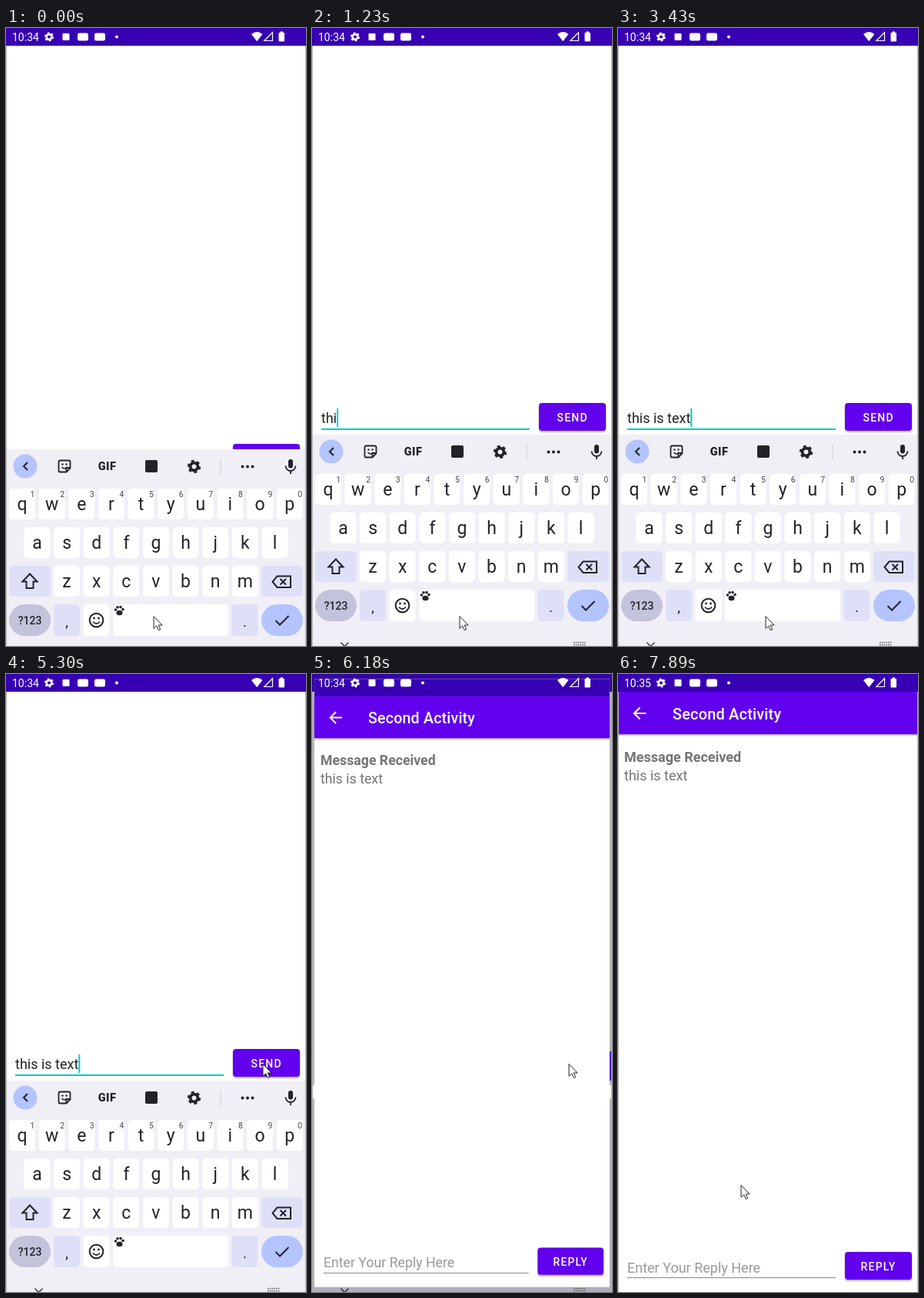
Recreate the animation shown at these times as an HTML page. Size 390x801 px, loop 8000 ms.

```html
<!DOCTYPE html>
<html lang="en">
<head>
<meta charset="utf-8">
<title>Message between two screens</title>
<style>
html, body { margin: 0; height: 100%; overflow: hidden; background: #fff; }
svg { display: block; width: 100%; height: 100%; }
text { font-family: Roboto, sans-serif; white-space: pre; }
.field { font-size: 18px; }
.button { font-size: 14px; font-weight: 500; letter-spacing: 1.25px; fill: #fff; }
.line { fill: none; stroke-width: 2; }
</style>
</head>
<body>
<svg id="stage" viewBox="0 0 390 801">
  <defs>
    <filter id="shadow" x="-10%" y="-20%" width="120%" height="150%">
      <feDropShadow dx="0" dy="1.5" stdDeviation="1.2" flood-opacity=".35"/>
    </filter>
    <clipPath id="buttonShape"><rect x="295" y="486" width="87" height="36" rx="4"/></clipPath>
  </defs>
  <rect width="390" height="801" fill="#fff"/>

  <g id="first">
    <g id="form">
      <text id="typed" class="field" x="12" y="512" fill="#222"></text>
      <rect x="12" y="519" width="271" height="2" fill="#03d0c4"/>
      <rect id="caret" y="493" width="2" height="24" fill="#03d0c4"/>
      <rect x="295" y="486" width="87" height="36" rx="4" fill="#6200ee" filter="url(#shadow)"/>
      <g clip-path="url(#buttonShape)"><circle id="ripple" cx="336" cy="507" fill="#fff"/></g>
      <text class="button" x="318.5" y="509.5">SEND</text>
    </g>
    <g id="keyboard"></g>
  </g>

  <g id="behind">
    <rect width="390" height="801" fill="#b6b6b8"/>
    <rect y="533" width="390" height="17" fill="#f4f4f4"/>
    <rect y="550" width="390" height="251" fill="#b0aebb"/>
    <rect x="386" y="489" width="4" height="38" fill="#5000c4"/>
    <rect width="390" height="23" fill="#3206a2"/>
  </g>

  <g id="second">
    <rect width="390" height="801" fill="#fff"/>
    <rect y="23" width="390" height="55" fill="#6200ee" filter="url(#shadow)"/>
    <rect width="390" height="23" fill="#3700b3"/>
    <path class="line" stroke="#fff" d="M28.5 43.5L21 51l7.5 7.5M21 51h15.5"/>
    <text x="71" y="58.5" font-size="19.9" font-weight="500" letter-spacing=".2" fill="#fff">Second Activity</text>
    <g class="field" fill="#757575">
      <text x="8" y="113.5" font-weight="700">Message Received</text>
      <text x="8" y="138">this is text</text>
      <text x="12" y="775.5" fill="#999">Enter Your Reply Here</text>
    </g>
    <rect x="12" y="782" width="271" height="1" fill="#888"/>
    <rect x="295" y="749" width="87" height="36" rx="4" fill="#6200ee" filter="url(#shadow)"/>
    <text class="button" x="315.5" y="773">REPLY</text>
  </g>

  <g id="nav"></g>
  <rect id="statusBar" width="390" height="23" fill="#3700b3"/>
  <g id="status" fill="#fff"></g>
  <path d="M.5 23V801M389.5 23V801" stroke="#b4b4b4"/>
  <path id="mouse" fill="#fff" stroke="#222" stroke-linejoin="round"
    d="M.5.5V16.3L4.2 12.9L6.8 18.6L9.2 17.5L6.7 12H11.6Z"/>
</svg>

<script>
const $ = id => document.getElementById(id);
const INK = '#222228', TINT = '#dfe0f8', BLUE = '#b4c4ff';

const rect = (x, y, w, h, fill, rx = 0) =>
  `<rect x="${x}" y="${y}" width="${w}" height="${h}" rx="${rx}" fill="${fill}"/>`;
const circle = (x, y, r, attrs = '') => `<circle cx="${x}" cy="${y}" r="${r}" ${attrs}/>`;
const stroke = (d, width = 2) =>
  `<path d="${d}" fill="none" stroke="${INK}" stroke-width="${width}"/>`;
const label = (x, y, size, str, attrs = '') =>
  `<text x="${x}" y="${y}" font-size="${size}" text-anchor="middle" ${attrs}>${str}</text>`;
const gear = (x, y, s, color) => `<g transform="translate(${x} ${y}) scale(${s})" fill="none" stroke="${color}">` +
  circle(0, 0, 4.9, 'stroke-width="3.8"') +
  circle(0, 0, 7.4, 'stroke-width="2.6" pathLength="12" stroke-dasharray="1 1"') + '</g>';

function keyRow(letters, x0, y, hints) {
  return [...letters].map((c, i) => {
    const x = x0 + i * 38.63;
    return rect(x, y, 34, 40, '#fff', 5) + label(x + 17, y + 27.5, 23, c) +
      (hints ? label(x + 30.5, y + 10.5, 10.5, (i + 1) % 10, 'fill="#44444c"') : '');
  }).join('');
}

function toolbar() {
  return circle(25, 549, 15.5, `fill="${BLUE}"`) + stroke('M28 544l-5 5 5 5') +
    stroke('M70.5 541.5h11a2 2 0 0 1 2 2v8l-5 5h-8a2 2 0 0 1-2-2v-11a2 2 0 0 1 2-2ZM83 551h-4.500v5', 1.8) +
    stroke('M72.500 550q3.500 4 7 0', 1.500) + circle(73.500, 546.500, 1.2) + circle(78.500, 546.500, 1.2) +
    label(131.5, 554, 14.5, 'GIF', 'font-weight="900" letter-spacing=".5"') +
    rect(181, 541, 16, 16, INK, 2) +
    gear(244.5, 549.5, 1, INK) + rect(278.5, 539, 1, 21, '#cfced6') +
    [307.5, 314, 320.5].map(x => circle(x, 549.5, 2)).join('') +
    rect(367, 540, 6, 11.5, INK, 3) + stroke('M363.5 548.500a6.500 6.500 0 0 0 13 0M370 555v4', 1.8);
}

function bottomRow() {
  const paw = [[142.5, 735], [145, 731.8], [149, 731.5], [152, 734.5]];
  return rect(4, 728, 54, 41, '#c4c3dc', 20.5) + label(31, 754, 14, '?123', 'font-weight="500"') +
    rect(62, 728, 34, 41, TINT, 5) + label(79, 757, 19, ',') +
    rect(100.5, 728, 34, 41, '#fff', 5) +
    circle(117.5, 748.5, 8.8, `fill="none" stroke="${INK}" stroke-width="2"`) +
    circle(114.5, 746, 1.4) + circle(120.5, 746, 1.4) + stroke('M113 750.500q4.500 5 9 0', 1.8) +
    rect(139, 728, 150, 41, '#fff', 5) +
    paw.map(([x, y]) => circle(x, y, 1.8)).join('') +
    '<ellipse cx="147.500" cy="739" rx="4" ry="3.300"/>' +
    rect(293.500, 728, 34, 41, TINT, 5) + label(310.5, 757, 19, '.') +
    rect(332, 728, 54, 41, BLUE, 20.5) + stroke('M350.500 749l5.500 5.500 11.500-11.500', 2);
}

$('keyboard').innerHTML = `<g fill="${INK}">` + rect(0, 527, 390, 290, '#f1eff6') + toolbar() +
  keyRow('qwertyuiop', 4, 578, true) + keyRow('asdfghjkl', 23.5, 628) +
  rect(4, 678, 54, 40, TINT, 5) + keyRow('zxcvbnm', 62, 678) + rect(332, 678, 54, 40, TINT, 5) +
  stroke('M31 688.500l-9.500 10h5v8.500h9v-8.500h5Z') +
  stroke('M352.500 691.500h17.500v14.500h-17.500l-6-7.250ZM356.500 695l7.500 7.500m0-7.500l-7.500 7.500') +
  bottomRow() + '</g>';

$('nav').innerHTML = stroke('M37.500 796.500l5 5 5-5', 1.3) +
  `<path d="M340 796.500h15.500M340 799.500h15.500" stroke="#66666c" stroke-width="1.600" stroke-dasharray="1.700 1.050"/>`;

$('status').innerHTML = '<text id="clock" x="8" y="16.500" font-size="14"></text>' +
  gear(56, 11.5, .7, '#fff') + rect(73.5, 7, 9, 9, '#fff', 1) +
  rect(93, 6.5, 14, 10, '#fff', 2.5) + rect(115, 6.5, 14, 10, '#fff', 2.5) + circle(144, 11.5, 2) +
  '<path d="M319 8q7.250-6 14.500 0L326.200 17.300Z"/>' +
  '<path d="M346.500 5.800v10.700h-10.700Z" fill="none" stroke="#fff" stroke-width="1.200"/>' +
  rect(354.5, 6, 7.5, 11.5, '#fff', 1) + rect(356.5, 4.5, 3.5, 3, '#fff');

// Each list holds [start ms, value...]; the latest started entry applies.
const typing = [[0, 0], [480, 1], [840, 2], [960, 3], [1350, 4], [1500, 5], [1880, 6],
  [2250, 7], [2500, 8], [2750, 9], [3000, 10], [3280, 11], [3430, 12]];
const caretOn = [[0, 0], [240, 1], [3930, 0], [4450, 1], [4930, 0], [5300, 1]];
const rise = [[0, 53, 19], [120, 14, 5], [240, 0, 0]];
const ripples = [[0, 0, 0], [5550, 14, .22], [5670, 32, .22], [5790, 55, .2], [5910, 60, .14], [6030, 60, .07]];
const zoom = [[0, 0], [6180, .984], [6330, .996], [6450, 1]];
const mousePath = [[0, 191.5, 762], [4180, 270, 712], [4300, 363, 669], [4450, 378, 590],
  [4570, 250, 440], [4690, 46, 490], [4810, 150, 512], [4930, 280, 508], [5050, 333.5, 505],
  [7650, 290, 545], [7770, 205, 622], [7890, 159.5, 662]];

const at = (list, t) => list.findLast(e => e[0] <= t).slice(1);
const show = (id, on) => $(id).setAttribute('display', on ? 'inline' : 'none');
const move = (id, x, y) => $(id).setAttribute('transform', `translate(${x} ${y})`);

function draw(now) {
  const t = now % 8000;
  const [formY, keysY] = at(rise, t);
  move('form', 0, formY);
  move('keyboard', 0, keysY);

  $('typed').textContent = 'this is text'.slice(0, at(typing, t)[0]);
  $('caret').setAttribute('x', 12 + $('typed').getComputedTextLength());
  show('caret', at(caretOn, t)[0]);

  const [radius, glow] = at(ripples, t);
  $('ripple').setAttribute('r', radius);
  $('ripple').setAttribute('opacity', glow);

  const [scale] = at(zoom, t);
  show('first', !scale);
  show('second', scale);
  show('behind', scale && scale < 1);
  show('statusBar', !scale);
  $('second').setAttribute('transform', `translate(195 400) scale(${scale || 1}) translate(-195 -400)`);
  show('nav', t >= 240 && t < 6450);

  $('clock').textContent = t < 6700 ? '10:34' : '10:35';
  move('mouse', ...at(mousePath, t));
  requestAnimationFrame(draw);
}
requestAnimationFrame(draw);
</script>
</body>
</html>
```
